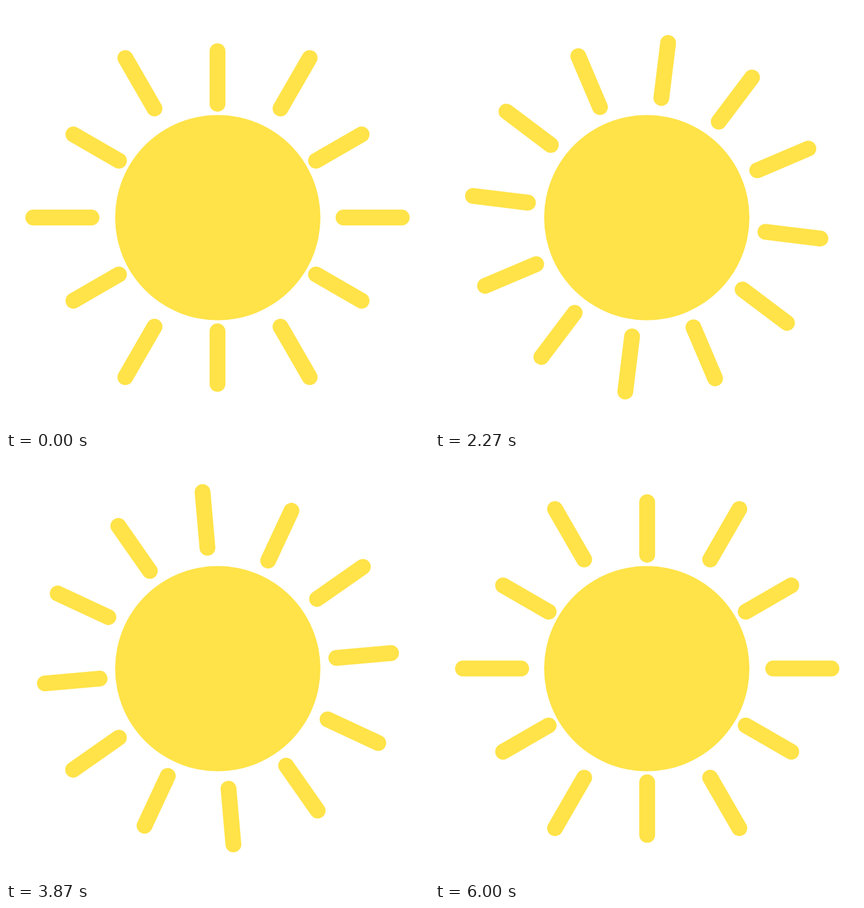
Animation of 748x748 px, one loop 6060 ms. Source, as an HTML page with a canvas:

```html
<!DOCTYPE html>
<html lang="en">
<head>
<meta charset="utf-8">
<title>Sun</title>
<style>
  html, body { margin: 0; width: 100%; height: 100%; overflow: hidden; background: #fff; }
  canvas { display: block; width: 748px; height: 748px; }
</style>
</head>
<body>
<canvas id="stage" width="748" height="748"></canvas>
<script>
const ctx = document.getElementById('stage').getContext('2d');
const SIZE = 748, LOOP = 6060, LAST = 180, BEAT = 45;
const YELLOW = '#ffe348';
const RAY = { inner: 212, outer: 310, width: 28, swing: 0.051 };
const RAD = Math.PI / 180;

// 30 ticks per second, on a 10 ms clock
function tickAt(ms) {
  const rest = ms % 100;
  const tick = 3 * Math.floor(ms / 100) + (rest >= 30) + (rest >= 70);
  return Math.min(tick, LAST);
}

// One degree per tick; each beat starts with a held tick and ends with a double step
function angleAt(tick) {
  return tick % BEAT === 0 ? tick : tick - 1;
}

function drawRay(deg, scale) {
  const x = Math.cos(deg * RAD) * scale, y = Math.sin(deg * RAD) * scale;
  ctx.beginPath();
  ctx.moveTo(x * RAY.inner, y * RAY.inner);
  ctx.lineTo(x * RAY.outer, y * RAY.outer);
  ctx.stroke();
}

function draw(ms) {
  const angle = angleAt(tickAt(ms));
  const pulse = RAY.swing * Math.cos(angle / BEAT * Math.PI);

  ctx.fillStyle = '#fff';
  ctx.fillRect(0, 0, SIZE, SIZE);

  ctx.fillStyle = YELLOW;
  ctx.beginPath();
  ctx.arc(374.5, 374.2, 181.5, 0, 2 * Math.PI);
  ctx.fill();

  ctx.save();
  ctx.translate(374.6, 374.1);
  ctx.rotate(angle * RAD);
  ctx.translate(-0.6, 0); // the ray ring sits slightly off its pivot
  ctx.strokeStyle = YELLOW;
  ctx.lineWidth = RAY.width;
  ctx.lineCap = 'round';
  for (let i = 0; i < 12; i++) {
    drawRay(i * 30, 1 + (i % 2 ? -pulse : pulse));
  }
  ctx.restore();
}

const start = performance.now();
function loop() {
  draw((performance.now() - start) % LOOP);
  requestAnimationFrame(loop);
}
loop();
</script>
</body>
</html>
```
